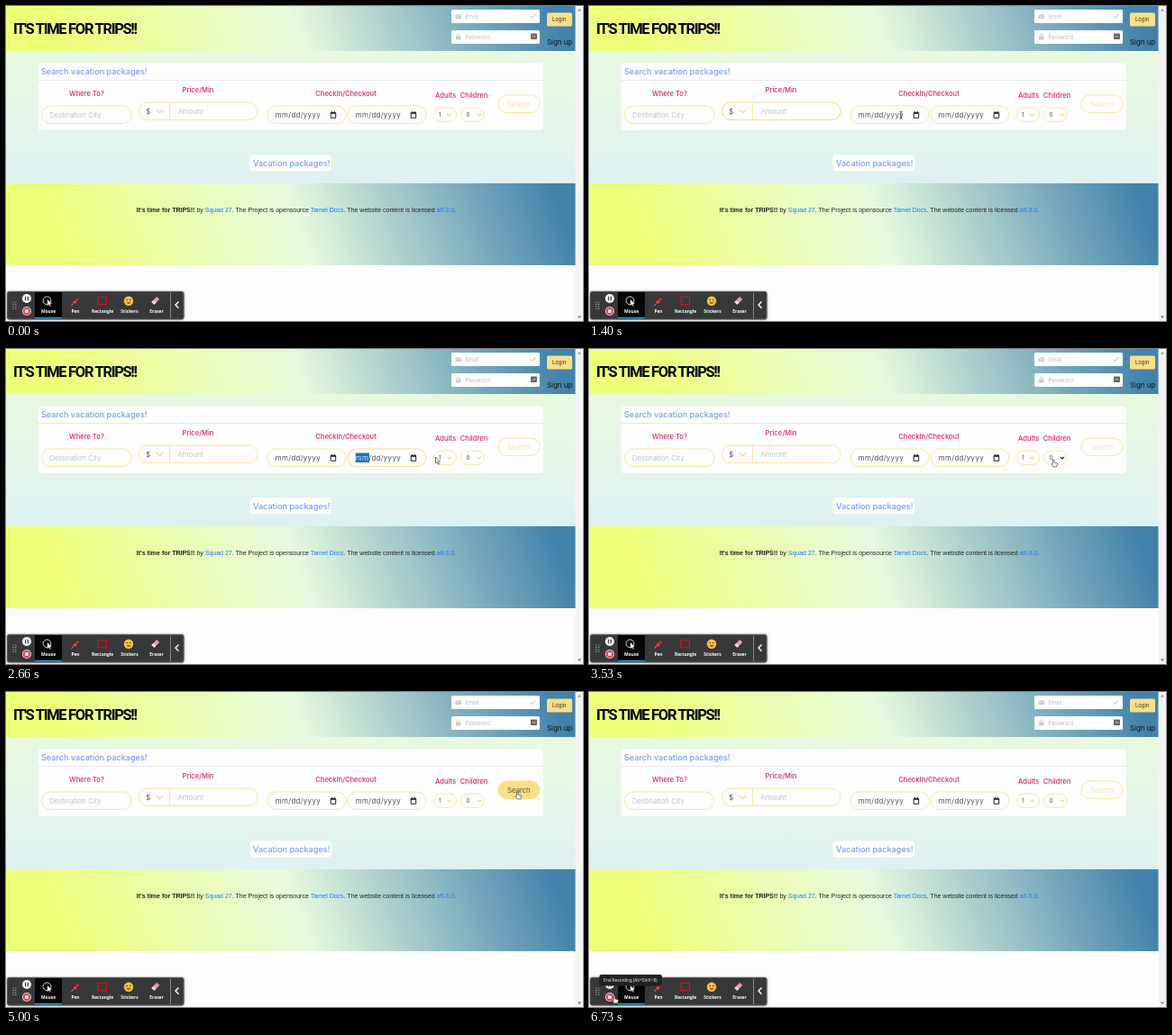
Recreate the animation shown at these times as an HTML page. Size 640x350 px, loop 6.8 s.

```html
<!DOCTYPE html>
<html lang="en">
<head>
<meta charset="utf-8">
<style>
html, body { margin: 0; width: 100%; height: 100%; overflow: hidden; background: #fdfdfd; }
div, svg { position: absolute; left: 0; top: 0; width: 631.5px; }
svg { width: 640px; height: 350px; }
.band { background: linear-gradient(70deg, #edff78 10%, #e8fadf 51%, #4282ab 96%); }
.page { top: 50px; height: 147px; background: linear-gradient(#e9f9df, #def1f2); }
text { font-family: Inter, Roboto, sans-serif; white-space: pre; }
.brand { font: 700 16.5px Roboto, sans-serif; letter-spacing: -1.3px; }
.head { font-size: 9.1px; font-weight: 500; fill: #7a9cf2; }
.label { font-size: 7.6px; font-weight: 500; fill: #d9285f; text-anchor: middle; }
.light { font-size: 7.9px; font-weight: 300; fill: #222; }
.ghost { font-size: 7.9px; font-weight: 300; fill: #b0b4b9; }
.small { font-size: 5.9px; fill: #b9bcc0; }
.date { letter-spacing: .38px; }
.foot { font: 7px "Liberation Sans", Arial, sans-serif; text-anchor: end; fill: #222; }
.foot .a { fill: #1677ff; }
.tool { font: 700 4.9px "Open Sans", sans-serif; fill: #fff; text-anchor: middle; }
.field, .chev { fill: none; stroke: #fbe7a4; }
.field { fill: #fdfdfd; }
.focus { stroke: #fae093; stroke-width: 1.2; }
.chev { stroke: #f5d877; stroke-width: 1.1; }
#bar { filter: drop-shadow(0 0 1px #777); }
</style>
</head>
<body>
<div class="band" style="height:50px"></div>
<div class="page"></div>
<div class="band" style="top:197px;height:91px"></div>
<svg id="stage" viewBox="0 0 640 350"></svg>
<script>
const $ = id => document.getElementById(id);
const text = (x, y, cls, s, extra = "") => `<text x="${x}" y="${y}" class="${cls}" ${extra}>${s}</text>`;
const box = (x, y, w, h, r, fill, extra = "") =>
  `<rect x="${x}" y="${y}" width="${w}" height="${h}" rx="${r}" fill="${fill}" ${extra}/>`;
const path = (d, stroke, width = 1, fill = "none") =>
  `<path d="${d}" stroke="${stroke}" stroke-width="${width}" fill="${fill}"/>`;
const circle = (x, y, r, fill) => `<circle cx="${x}" cy="${y}" r="${r}" fill="${fill}"/>`;
const field = (x, y, w, h, id) => `<rect id="${id}" class="field" x="${x}" y="${y}" width="${w}" height="${h}" rx="${h / 2}"/>`;
const chevron = (x, y, r, id) => `<path id="${id}" class="chev" d="M${x - r} ${y - r / 2}l${r} ${r}l${r} ${-r}"/>`;

const card = (x, y, w, h) => box(x, y, w, h, 4, "#fcfdfc", 'stroke="#e3eae4" stroke-width=".5"');

const calendar = x => path(`M${x} 118.5h5.5v5.8h-5.5zM${x} 119.3h5.5M${x + 1.2} 117v2M${x + 4.3} 117v2`, "#222");

const dateField = (x, id, mark = "") => field(x, 111, 87, 19.5, id) + mark +
  text(x + 8.8, 124, "light date", `<tspan id="${id}Month">mm</tspan>/dd/yyyy`) + calendar(x + 70.2);

const login = [
  box(494, 4, 98, 15, 1.5, "#fff"), box(494, 27, 98, 15, 1.5, "#fff"),
  box(498.5, 9.3, 6.5, 4.8, .6, "#c9ccd0"), path("M498.8 9.7l3 2.4 3-2.4", "#fff", .6),
  box(499, 33.5, 5.5, 4, .5, "#c9ccd0"), path("M500.2 34v-1.5a1.5 1.5 0 0 1 3 0v1.5", "#c9ccd0"),
  path("M581.5 11.5l2 2 4-4.2", "#b5b5b5"),
  box(582, 30.5, 7, 6.5, .7, "#666"), path("M583.5 34h4", "#ddd", .8),
  text(509.5, 13.8, "small", "Email"), text(509.5, 36.8, "small", "Password"),
  box(600, 7.5, 28, 15, 1.5, "#fbdf88"),
  text(606, 17.2, "small", "Login", 'style="fill:#333"'),
  text(600, 43.3, "light", "Sign up", 'style="fill:#111;font-weight:400"')
];

const search = [
  card(35, 63, 561.5, 75.5), path("M35 82.5H596.5", "#e3e5e4", .8),
  text(39, 76, "head", "Search vacation packages!"),
  ...[[89.5, 99.5, "Where To?"], [213, 95.5, "Price/Min"], [377, 99.8, "CheckIn/Checkout"],
    [487.5, 102.3, "Adults"], [519, 102.3, "Children"]].map(([x, y, s]) => text(x, y, "label", s)),
  field(39.5, 111, 99.5, 19.5, "city"), text(48, 124, "ghost", "Destination City"),
  field(147.5, 107, 131.5, 19.5, "price"), path("M181.5 107v19.5", "#fbe7a4"),
  text(155.3, 120, "light", "$"), chevron(170.5, 117, 3.5, "priceArrow"), text(190.5, 120, "ghost", "Amount"),
  dateField(290, "arrive"),
  dateField(379, "leave", box(387.7, 115.5, 15.2, 10.5, 0, "#1b74bd", 'id="mark"')),
  field(474.5, 113, 25, 15.5, "adults"), text(480, 123.2, "light", "1", 'style="font-size:6.6px"'), chevron(491.3, 121, 2, "adultsArrow"),
  field(504.5, 113, 25.5, 15.5, "children"), text(510.5, 123.2, "light", "0", 'style="font-size:6.6px"'), chevron(525, 121, 2, "childrenArrow"),
  field(546, 99, 46, 19.5, "go"), text(556, 112, "ghost", "Search", 'id="goText"'),
  card(270, 165, 91.5, 19), text(274, 177.6, "head", "Vacation packages!")
];

const link = s => `<tspan class="a">${s}</tspan>`;
const footer = text(499, 229, "foot", `<tspan font-weight="700">It's time for TRIPS!!</tspan> by ${link("Squad 27")}. ` +
  `The Project is opensource ${link("Tarnel Docs")}. The website content is licensed ${link("afl-3.0")}.`);

const scrollbar = box(631.5, 0, 8.5, 350, 0, "#f3f3f3") +
  path("M633.8 5.5l2.2-2.5 2.2 2.5z", "none", 0, "#999") + path("M633.8 344.5l2.2 2.5 2.2-2.5z", "none", 0, "#777");

let dots = "";
for (let i = 0; i < 8; i++) dots += circle(8 + i % 2 * 2.8, 329 + (i >> 1) * 2.4, .6, "#ccc");

const toolbar = [
  box(1.5, 317.5, 195.5, 30.5, 2, "#363839", 'id="bar" stroke="#555"'), box(32, 318, 30, 29.5, 0, "#050505"),
  box(32, 345.8, 30, 1.7, 0, "#1e9be0"), dots,
  circle(23, 325, 5, "#fff"), path("M21.6 322.8v4.4M24.4 322.8v4.4", "#333", 1.2),
  circle(23, 339, 5, "#f6d4da"), circle(23, 339, 4.2, "#d8475e"), box(21.2, 337.2, 3.6, 3.6, .4, "#fff"),
  `<circle cx="45.5" cy="327.3" r="4.4" fill="none" stroke="#eee" stroke-width=".9"/>`,
  path("M45.8 325.8v7.4l1.8-1.5 1.3 2 1-.6-1.1-2h2.3z", "#050505", .3, "#fff"),
  path("M73.5 331.5l1-3 4.8-4.8 2 2-4.8 4.8z", "none", 0, "#e11d2e"), path("M72.5 332.5l2-1.5M75.5 328l2.2 2.2", "#fff", .6),
  box(102, 323.3, 9.5, 8.5, 0, "none", 'stroke="#d3131f" stroke-width="1.2"'),
  circle(136, 327.7, 5.2, "#f8c443"), circle(134.2, 326.6, .8, "#5b3413"), circle(137.8, 326.6, .8, "#5b3413"),
  path("M133.3 329.2q2.7 3.2 5.4 0z", "none", 0, "#8d2d1d"),
  path("M161.3 329l5.8-6 3.2 2.8-5.8 6z", "none", 0, "#f19aa5"), path("M161.3 329l2-2 3.2 2.8-2 2z", "none", 0, "#f7d9d9"),
  ...["Mouse", "Pen", "Rectangle", "Stickers", "Eraser"].map((s, i) => text(47 + i * 30, 340.5, "tool", s)),
  path("M182.5 318.5v28.5", "#aaa", .7), path("M191.5 328.5l-3.5 3.6 3.5 3.6", "#fff", 1.4),
  `<g id="tip">${box(11.5, 314, 69.5, 12.5, 2, "#202122")}` +
  text(46, 322, "tool", "End Recording (Alt+Shift+R)", 'style="font-weight:500;font-size:4.7px"') + "</g>"
];

const pointers = {
  arrow: path("M0 0v7l1.6-1.4 1.2 2.7 1.2-.6-1.2-2.5h2.2z", "#222", .6, "#fff"),
  beam: path("M-1.3-3.5h2.6M0-3.5v7M-1.3 3.5h2.6", "#222", .7),
  hand: path("M-.6 0q.8-1 1.5 0v3l3 .7q.8.3.6 1.2l-.7 3H0L-2 5q0-1.3 1.4-.4z", "#222", .6, "#fff")
};
const cursor = '<g id="cursor">' + Object.entries(pointers).map(([k, d]) => `<g id="${k}">${d}</g>`).join("") + "</g>";

$("stage").innerHTML = text(8, 30.5, "brand", "IT'S TIME FOR TRIPS!!") +
  [...login, ...search, footer, scrollbar, ...toolbar, cursor].join("");

// Pointer stops: time, x, y
const stops = [[330, 70, 150], [600, 92, 121], [800, 110, 121], [1050, 215, 118], [1250, 255, 118], [1400, 346, 121],
  [1750, 346, 121], [2050, 396, 121], [2350, 400, 121], [2660, 476.5, 120], [2950, 486, 122], [3250, 488, 122],
  [3530, 515, 123], [3850, 515, 123], [4150, 567, 111], [5870, 567, 111], [6600, 28, 338], [6800, 28, 338]];
const areas = { city: [39, 111, 139, 131], price: [147, 107, 279, 127], arrive: [290, 111, 377, 131],
  leave: [379, 111, 466, 131], adults: [478, 113, 500, 129], children: [504, 113, 530, 129],
  go: [546, 99, 592, 119], stop: [18, 334, 29, 345] };

function place(t) {
  const i = stops.findIndex(s => s[0] > t);
  if (i < 1) return stops[0].slice(1);
  const [a, b] = [stops[i - 1], stops[i]];
  const p = (t - a[0]) / (b[0] - a[0]), e = p * p * (3 - 2 * p);
  return [a[1] + (b[1] - a[1]) * e, a[2] + (b[2] - a[2]) * e];
}

const show = (id, on) => { $(id).style.display = on ? "" : "none"; };
const within = (t, a, b) => t >= a && t < b;

function draw(t) {
  const [x, y] = place(t);
  const over = Object.keys(areas).find(k => {
    const [l, u, r, d] = areas[k];
    return x >= l && x <= r && y >= u && y <= d;
  });
  const kind = /city|price|arrive|leave/.test(over) ? "beam" : over ? "hand" : "arrow";
  for (const k in pointers) show(k, k === kind);
  show("cursor", t >= 330 && !within(t, 5500, 5870));
  $("cursor").setAttribute("transform", `translate(${x} ${y})`);

  const picked = within(t, 2100, 2950);
  const focus = { city: within(t, 600, 950), price: within(t, 1050, 1500), leave: picked };
  for (const k in focus) $(k).classList.toggle("focus", focus[k]);
  show("mark", picked);
  $("leaveMonth").style.fill = picked ? "#fff" : "";
  $("childrenArrow").style.stroke = over === "children" ? "#222" : "";

  const lit = over === "go";
  $("go").style.fill = $("go").style.stroke = lit ? "#fbdf88" : "";
  $("goText").style.fill = lit ? "#333" : "#f6dc93";
  show("tip", t >= 6640);
}

const loop = 6800, step = loop / 102;
function tick() {
  draw(Math.floor(performance.now() % loop / step + .11) * step);
  requestAnimationFrame(tick);
}
tick();
</script>
</body>
</html>
```
